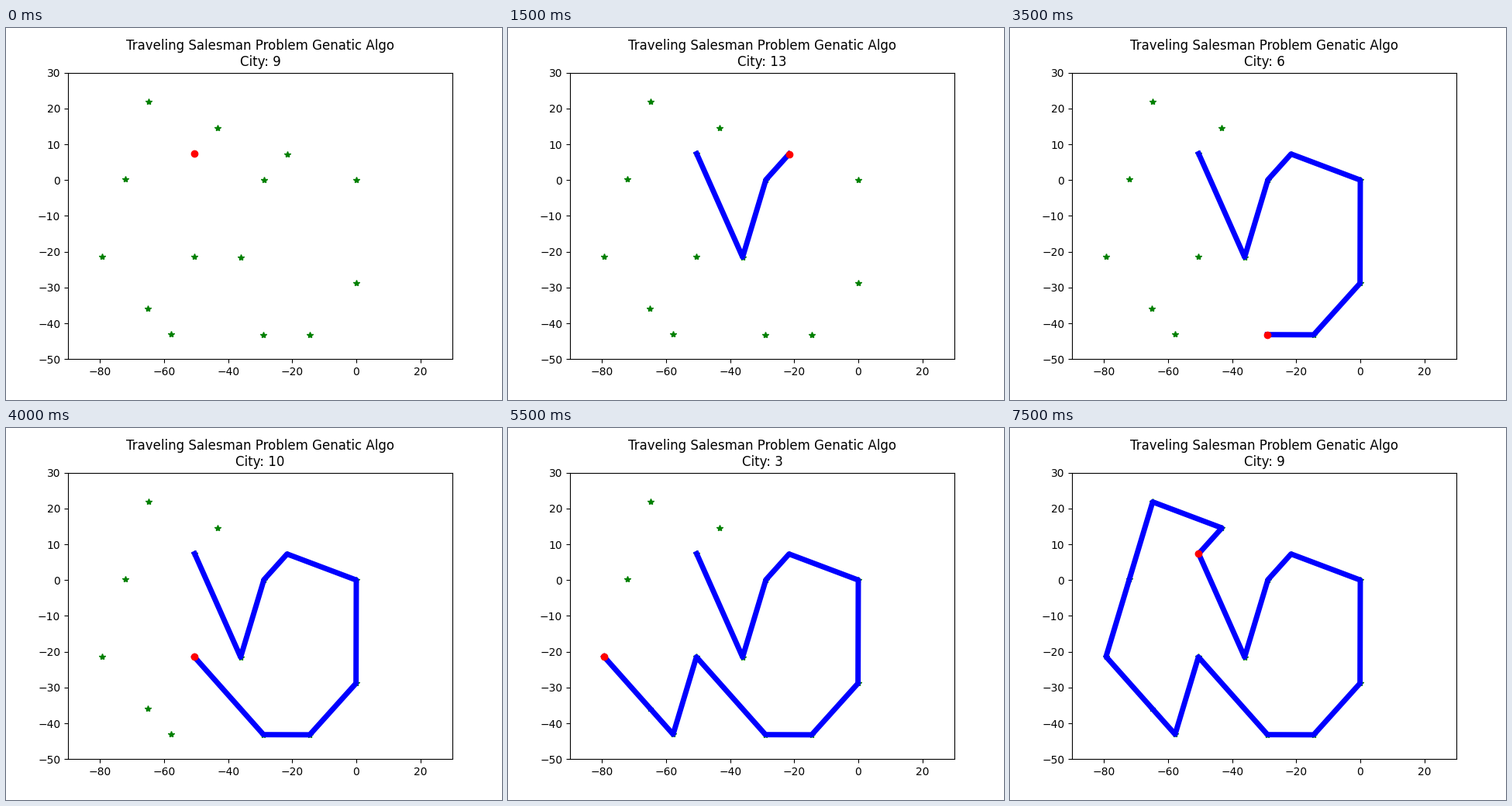
Recreate the animation shown at these times as a matplotlib script. Size 640 by 480 pixels, loop 8000 ms.

```python
import matplotlib.pyplot as plt
import numpy as np
from matplotlib.animation import FuncAnimation

STEP_MS = 500
# The cities sit on a square grid that is turned very slightly clockwise.
GRID = 7.21 * (1 - 0.003j)
# Grid cell of each city in visiting order, keyed by city number.
CELLS = {
    9: -7 + 1j, 8: -5 - 3j, 2: -4, 13: -3 + 1j, 1: 0,
    11: -4j, 4: -2 - 6j, 6: -4 - 6j, 10: -7 - 3j, 14: -8 - 6j,
    12: -9 - 5j, 3: -11 - 3j, 7: -10, 5: -9 + 3j, 15: -6 + 2j,
}

cities = list(CELLS)
tour = cities + cities[:1]
stops = GRID * np.array([CELLS[city] for city in tour])

fig, ax = plt.subplots(figsize=(6.4, 4.8), dpi=100)
ax.set(xlim=(-90, 30), ylim=(-50, 30))
ax.plot(stops[:-1].real, stops[:-1].imag, "g*")
route, = ax.plot([], [], "b-", linewidth=5)
salesman, = ax.plot([], [], "ro")
title = ax.set_title("")


def place(line, points):
    line.set_data(points.real, points.imag)


def update(step):
    place(route, stops[:step + 1])
    place(salesman, stops[step:step + 1])
    title.set_text(f"Traveling Salesman Problem Genatic Algo\nCity: {tour[step]}")
    return route, salesman, title


anim = FuncAnimation(fig, update, frames=len(tour), interval=STEP_MS,
                     repeat=True, repeat_delay=0, blit=False)
plt.show()
```
